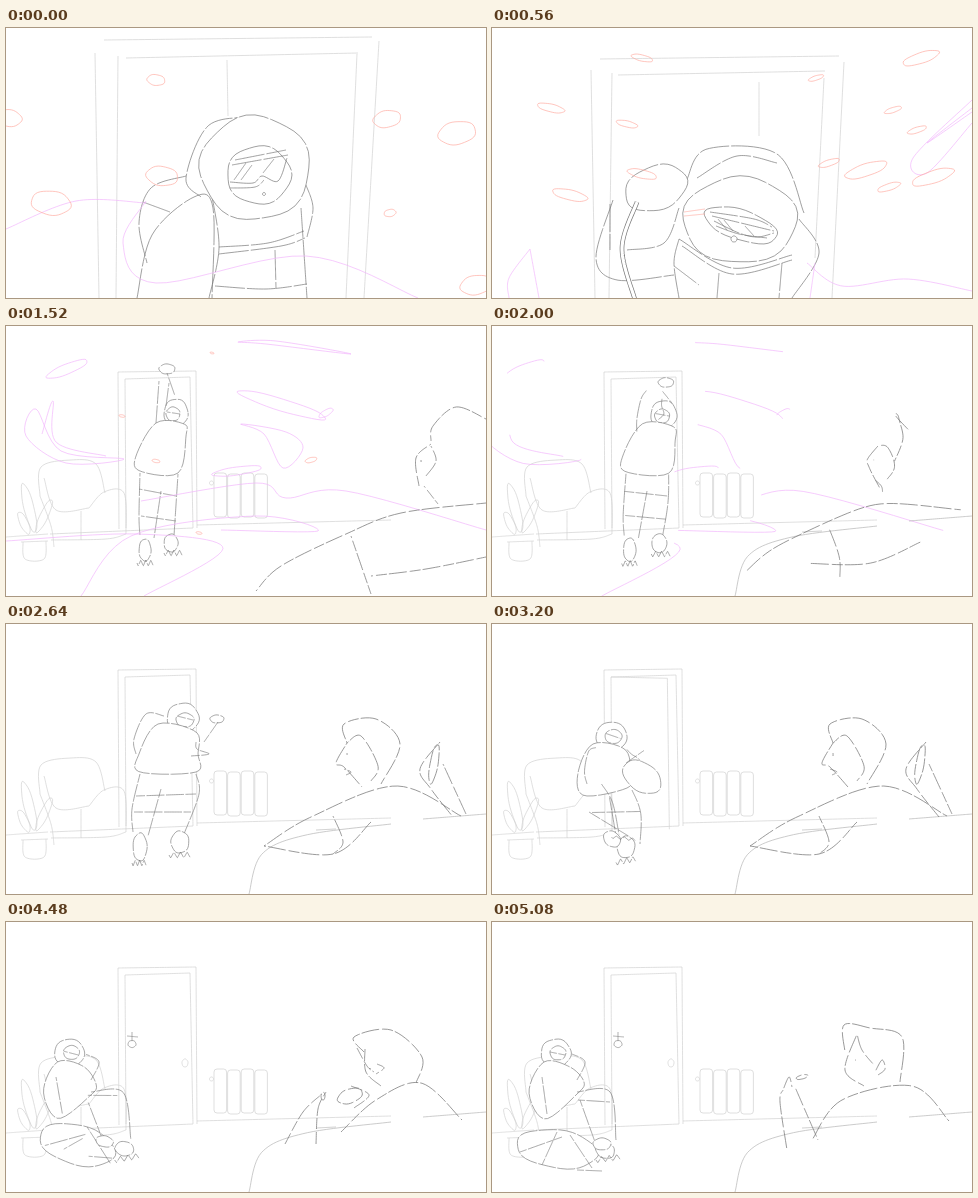
These frames come from a looping animation (480x270 px, 5.2 s). An HTML page with a canvas:

```html
<!DOCTYPE html>
<html>
<head>
<meta charset="utf-8">
<style>
html, body { margin: 0; height: 100%; overflow: hidden; background: #fff }
canvas { display: block; width: 480px; height: 270px }
</style>
</head>
<body>
<canvas id="stage"></canvas>
<script>
const LOOP = 5200, STEPS = 40;
const GREY = '#d2d2d2', INK = '#777', SNOW = '#ffaca3', WIND = '#f3b6fc';
const canvas = document.getElementById('stage'), g = canvas.getContext('2d');
const ratio = Math.max(1, window.devicePixelRatio || 1);
canvas.width = 480 * ratio;
canvas.height = 270 * ratio;

const sample = at => Array.from({ length: STEPS + 1 }, (_, i) => at(i / STEPS));

// Smooth curve through points; equal ends make a closed outline.
function spline(v) {
  const n = v.length / 2 - 1;
  const closed = n > 2 && v[0] === v[2 * n] && v[1] === v[2 * n + 1];
  const coord = (k, c) => v[2 * (closed ? (k + n) % n : Math.max(0, Math.min(n, k))) + c];
  const line = sample(s => {
    const u = s * n, j = Math.min(n - 1, Math.floor(u)), f = u - j;
    return [0, 1].map(c => {
      const [a, b, d, e] = [-1, 0, 1, 2].map(k => coord(j + k, c));
      return b + f / 2 * (d - a + f * (2 * a - 5 * b + 4 * d - e + f * (3 * (b - d) + e - a)));
    });
  });
  line.closed = closed;
  return line;
}
// Slightly uneven ellipse, turned by an angle in degrees.
function oval([x, y, rx, ry, turn = 0]) {
  const r = turn * Math.PI / 180;
  const line = sample(s => {
    const a = s * Math.PI * 2, k = 1 + .03 * Math.sin(a * 5 + x);
    const p = rx * k * Math.cos(a), q = ry * k * Math.sin(a);
    return [x + p * Math.cos(r) - q * Math.sin(r), y + p * Math.sin(r) + q * Math.cos(r)];
  });
  line.closed = true;
  return line;
}
const zigzag = ([x, y, x2, y2]) => sample(s => [x + (x2 - x) * s, y + (y2 - y) * s + 3 * Math.asin(Math.sin(s * 20)) / 1.6]);
const makers = { o: oval, z: zigzag };
const nums = s => s.trim().split(/\s+/).map(Number);
const shape = s => s.split('/').map(p => makers[p[0]] ? makers[p[0]](nums(p.slice(1))) : spline(nums(p)));

function morph(a, b, k) {
  if (k <= 0) return a;
  if (k >= 1) return b;
  const out = [];
  for (let i = 0; i < Math.max(a.length, b.length); i++) {
    const p = a[i], q = b[i];
    if (!p || !q) { if (p ? k < .5 : k >= .5) out.push(p || q); continue; }
    const line = p.map(([x, y], j) => [x + (q[j][0] - x) * k, y + (q[j][1] - y) * k]);
    line.closed = p.closed && q.closed;
    out.push(line);
  }
  return out;
}
const ease = (t, a, b) => {
  const k = Math.max(0, Math.min(1, (t - a) / (b - a)));
  return k * k * (3 - 2 * k);
};

function draw(lines, color, { w = .7, dash = [], shift = 0, fill = false, from = 0 } = {}) {
  g.strokeStyle = color;
  g.lineWidth = w;
  g.setLineDash(dash);
  g.lineDashOffset = shift;
  for (const line of lines) {
    g.beginPath();
    line.slice(Math.floor(from * STEPS)).forEach(([x, y]) => g.lineTo(x, y));
    if (fill && line.closed) { g.fillStyle = '#fff'; g.fill(); }
    g.stroke();
  }
}
function tube(lines, w) {
  draw(lines, INK, { w });
  draw(lines, '#fff', { w: w - 1.4 });
}
function snow(flakes, flat, grow, dx = 0) {
  for (let i = 0; i < flakes.length; i += 3) {
    const [x, y, r] = flakes.slice(i, i + 3);
    const turn = (1 - flat) * (x > 300 ? -25 : 18);
    draw([oval([240 + (x - 240) * grow + dx, 130 + (y - 130) * grow, r, r * flat, turn])], SNOW);
  }
}
function shifted(dx, dy, paint) {
  g.save();
  g.translate(dx, dy);
  paint();
  g.restore();
}

// Doorway close-up
const frameUp = shape('98 12 366 9/120 30 352 25/89 25 93 270/112 28 110 270/373 13 358 270/351 26 340 270/221 32 222 88');
const frameDown = shape('108 31 347 28/126 47 333 43/99 42 103 270/120 45 117 270/352 34 340 270/332 50 323 230/267 54 267 108');
const bodyUp = shape('180 148 145 160 133 195 141 235/131 270 146 207 188 169 207 180 206 270/206 168 213 220 203 270/295 180 301 270/300 157 307 180 301 209/213 219 262 215 298 203/213 226 275 218 299 210/209 258 260 261 301 256/269 222 270 260/137 174 164 184');
const bodyDown = shape('121 172 104 230 125 252 182 247/135 222 172 215 187 180/187 211 182 235 187 270/290 235 287 270/307 191 327 225 300 270/187 211 240 240 300 227/190 218 240 246 300 232/182 238 207 257/227 245 225 270/118 176 118 222');
const hoodUp = shape('195 169 180 150 202 98 245 89/o 249 140 55 52/o 253 147 32 29/229 132 280 122/226 137 282 127/224 154 247 155 256 148 272 153 281 130/224 160 249 159 258 152/228 152 240 135/235 152 246 137/257 145 268 131/o 258 166 1.5 1.5');
const hoodDown = shape('195 151 215 121 285 126 312 185/o 248 192 57 43/o 249 197 38 15 18/218 184 262 191 280 199/220 188 282 203/222 193 247 205 265 209 282 205/224 198 247 206 275 210/226 191 235 202/232 192 241 203/253 198 262 208/o 242 211 3 3');
const mitten = shape('o 164 160 32 22 -20/205 150 245 128 285 135');
const lead = shape('145 174 130 220 143 272');
const tag = shape('192 184 213 181/192 188 213 186');
const gustA = shape('0 201 70 173 140 175/140 173 117 215 150 255 300 228 412 270');
const gustB = shape('17 270 17 250 38 221/38 221 47 270/315 235 350 258 415 251 480 263/323 235 318 270/480 72 421 130 435 145 480 95/480 80 435 115 480 84');
const snowA = nums('381 91 14 451 105 19 156 148 16 45 175 20 2 90 14 470 257 16 150 52 9 384 185 6');
const snowB = nums('150 30 11 429 30 19 59 80 14 324 50 8 135 96 11 401 82 9 425 102 10 337 135 11 374 142 22 397 159 12 441 149 22 78 167 18 150 146 15');

// Plug close-up
const cable = shape('236 165 203 203 140 229 77 199 71 107 135 59 188 88 222 136 234 104');
const glove = shape('187 88 198 54 240 42 275 46 302 52 292 68/305 121 315 130 301 140 289 165/184 90 190 125 205 165 245 204 287 165/200 172 191 215 190 270/290 167 302 220 298 270');
const plug = shape('235 153 212 105 217 70 235 63 249 74/249 74 262 150/249 74 296 68/296 68 304 127/235 153 262 150 304 128/300 77 317 75/300 81 316 78/303 107 318 103/303 110 317 107');
const tip = shape('o 248 162 12 6 -15/o 264 160 5 2');
const spark = shape('309 99 326 106/322 94 317 112');
const gustC = shape('66 17 25 60 12 120 45 188 95 194 128 130 122 105 160 62 270 -2/67 18 30 103/34 125 68 155/78 155 113 100 200 0/422 -2 480 41/228 270 285 225 350 207 388 270/282 270 310 239 357 270');
const snowC = nums('21 65 7 60 112 5 73 198 5 105 255 12 434 42 7 418 141 9 400 207 23');

// Room
const doorway = shape('112 46 190 45/112 46 113 203/190 45 191 202/119 53 184 51/119 53 120 202/184 51 187 202/0 211 14 210/44 208 187 202/191 199 385 194');
const chair = shape('34 170 35 141 65 134 90 138 99 167/34 170 45 200 48 221/38 152 50 184 83 182/45 214 100 213 120 208/83 182 98 166 118 167 120 208/75 214 75 185');
const plant = shape('o 23 182 5 25 -14/o 38 190 4 18 25/o 18 197 4 12 -25/14 210 42 208/15 216 42 215/17 216 19 233 38 233 40 215');
const hanger = shape('126 110 126 119/121 114 132 115/o 126 122 4 3.5');
const knob = shape('o 179 141 3 4');
const sofa = shape('243 270 256 230 300 211 385 200/310 206 330 205/417 195 480 190');

const manArmUp = shape('o 170 87 12 14/o 167 88 7 7/161 86 174 88/150 97 130 130 134 145 172 147 180 110 178 98 150 97/153 55 150 97/163 57 160 80/o 161 43 8 5/134 147 133 190 134 210/155 165 148 212/172 148 168 210/133 163 170 170/135 190 170 195/o 139 224 6 11/o 165 217 7 9/z 131 237 147 237/z 158 227 176 227/161 47 169 70');
const manThrow = shape('o 177 94 16 15/o 179 96 9 7/171 92 187 96/152 100 133 130 134 148 190 148 192 130 190 108 152 100/158 92 140 90 128 115 130 130/190 118 191 125 203 130 185 132/o 211 95 7 4/134 150 126 185 127 208/155 165 142 212/190 150 193 170 178 210/130 172 190 170/128 188 185 188/o 134 223 7 14/o 174 218 9 11/z 126 239 140 239/z 163 231 184 231/198 118 212 98');
const manSeated = shape('o 62 131 15 14/o 64 129 8 7/57 127 70 133/50 140 39 168 50 195 80 180 85 170 76 143 50 140/50 155 60 190/80 133 93 140 85 158/o 89 211 37 25 42/85 170 115 172 127 213/80 182 110 235/90 182 118 230/70 205 106 205/66 188 88 236/o 134 223 12 8 -30/o 66 212 10 5 40/z 122 238 147 231/76 195 102 200/70 160 92 155');
const manResting = shape('o 64 131 15 14/o 66 131 8 7/58 130 73 133/52 140 37 170 53 197 85 172 92 160 78 145 52 140/50 155 55 192/80 132 93 140 85 158/o 65 227 41 19 8/85 170 118 170 124 218/50 243 65 210/78 213 100 246/28 230 70 215/88 178 103 220/o 113 228 10 8 30/o 110 222 9 6/z 104 238 128 235/85 248 110 249/86 178 118 180');

const watcherNear = shape('480 93 450 81 427 100 425 115/425 118 410 132 413 160/418 160 432 178/425 120 430 135 420 150/415 134 415 136/250 265 275 240 340 208 395 187 480 177/345 210 365 268/365 250 420 243 480 231');
const watcherTurned = shape('341 119 338 100 370 95 394 120 375 160/341 119 330 139 338 143 356 163/338 145 345 148 340 151/341 119 355 112 372 142 365 157/341 129 341 132/258 222 305 193 390 162 455 192/327 192 337 218 327 230/258 222 327 230 365 198/434 118 414 145 425 165 447 193/437 140 460 190/o 428 140 4 20 10');
const watcherPhone = shape('358 130 348 115 385 108 416 135 410 161/359 127 360 150 375 164/371 142 378 146 370 152/351 126 361 144 368 150/364 146 364 147/335 210 370 178 415 161 456 198/279 222 297 190 316 172/310 222 312 187 320 170/345 164 363 173 348 186/o 344 174 13 7 -20/o 317 174 2 4');
const watcherPen = shape('353 130 352 103 378 106 410 115 408 160/365 112 353 148 372 164/383 150 390 138 393 147 386 153/365 112 370 128 382 143/361 138 364 138/320 218 350 178 420 164 457 199/295 228 288 180 291 168/303 165 326 218/291 168 297 155 300 165/o 310 155 6 2 -15');
const gustD = shape('232 16 270 15 345 28 260 18 232 16/o 61 43 22 5 -22/o 276 79 46 6 17/o 320 87 8 3 -30/235 98 280 106 297 122 277 142 258 108 235 98/20 110 30 83 55 125 118 133 60 137 20 110/36 108 47 75 50 116 100 130/o 231 145 25 4 -8/135 175 250 157 280 172 340 165 480 204/75 270 125 210 250 190 312 205 215 204/0 215 130 208 217 222 138 270');
const snowD = nums('305 134 6 150 135 4 193 207 3 116 90 3 206 27 2');

function doorShot(t, tick) {
  const k = ease(t, 0, 560), early = t < 320, age = t - (early ? 0 : 560);
  const pen = { dash: [30, 2, 45, 2], shift: tick * 7, fill: true };
  draw(morph(frameUp, frameDown, k), GREY);
  draw(morph(bodyUp, bodyDown, k), INK, pen);
  draw(morph(hoodUp, hoodDown, k), INK, pen);
  if (!early) shifted(0, 50 * (1 - ease(t, 320, 560)), () => {
    draw(mitten, INK, pen);
    tube(lead, 4.6);
    draw(tag, SNOW);
  });
  shifted(age * .12, age * -.04, () => draw(early ? gustA : gustB, WIND));
  snow(early ? snowA : snowB, early ? .6 : .28, 1 + age / 700);
}

function plugShot(t, tick) {
  const age = t - 1120, pen = { dash: [24, 4, 14, 3], shift: tick * 5, fill: true };
  shifted(age * .1, age * -.05, () => draw(gustC, WIND));
  snow(snowC, 1, 1 + age / 700);
  shifted(-24 * (1 - ease(t, 800, 1080)), 0, () => {
    draw(glove, INK, pen);
    draw(plug, INK, pen);
    tube(cable, 5.6);
    draw(tip, INK, { fill: true });
  });
  if (t >= 1040) draw(spark, '#444', { w: .8 });
}

function between(t, poses, spans) {
  const i = spans.findIndex(([, end]) => t < end);
  return i < 0 ? poses[poses.length - 1] : morph(poses[i], poses[i + 1], ease(t, ...spans[i]));
}

function radiator() {
  g.strokeStyle = GREY;
  g.setLineDash([]);
  g.beginPath();
  for (let i = 0; i < 4; i++) g.roundRect(208 + i * 13.6, 147 + i % 2, 12.6, 44, 3);
  g.stroke();
  draw([oval([205.5, 157, 2, 2])], GREY);
}

function roomShot(t, tick) {
  draw(doorway, GREY);
  const swing = ease(t, 2800, 3320);
  if (swing > 0 && swing < 1) {
    const x = 120 + 64 * swing, low = 51 + 8 * Math.sin(swing * Math.PI);
    draw([spline([119, 53, x, low]), spline([x, low, x + 2, low + 151])], GREY);
  }
  if (swing === 1) {
    draw(knob, GREY);
    draw(hanger, INK, { w: .6 });
  }
  draw(chair, GREY);
  draw(plant, GREY);
  radiator();

  const man = between(t, [manArmUp, manThrow, manSeated, manResting], [[1760, 2480], [2800, 3600], [4000, 4720]]);
  draw(man, INK, { w: .65, dash: [18, 1.5], shift: tick * 5, fill: true });
  if (t < 2240) {
    const age = t - 1520;
    shifted(age * -.06, Math.sin(age / 160) * 3, () => draw(gustD, WIND, { from: ease(t, 1680, 2240) }));
    if (t < 2000) snow(snowD, .4, 1, age * -.08);
  }
  if (t >= 2000) draw(sofa, '#b5b5b5');
  const watcher = between(t, [watcherNear, watcherTurned, watcherPhone, watcherPen], [[1720, 2320], [3360, 3760], [4480, 5000]]);
  draw(watcher, INK, { w: .75, dash: [18, 3, 11, 2], shift: tick * 4 });
}

function render(now) {
  const time = now % LOOP;
  const hold = (time >= 1200 && time < 1680) || time >= 4000 ? 40 : 80;
  const tick = Math.floor(time / hold), t = tick * hold;
  g.setTransform(ratio, 0, 0, ratio, 0, 0);
  g.fillStyle = '#fff';
  g.fillRect(0, 0, 480, 270);
  (t < 800 ? doorShot : t < 1200 ? plugShot : roomShot)(t, tick);
  requestAnimationFrame(() => render(performance.now() - start));
}
const start = performance.now();
render(0);
</script>
</body>
</html>
```
